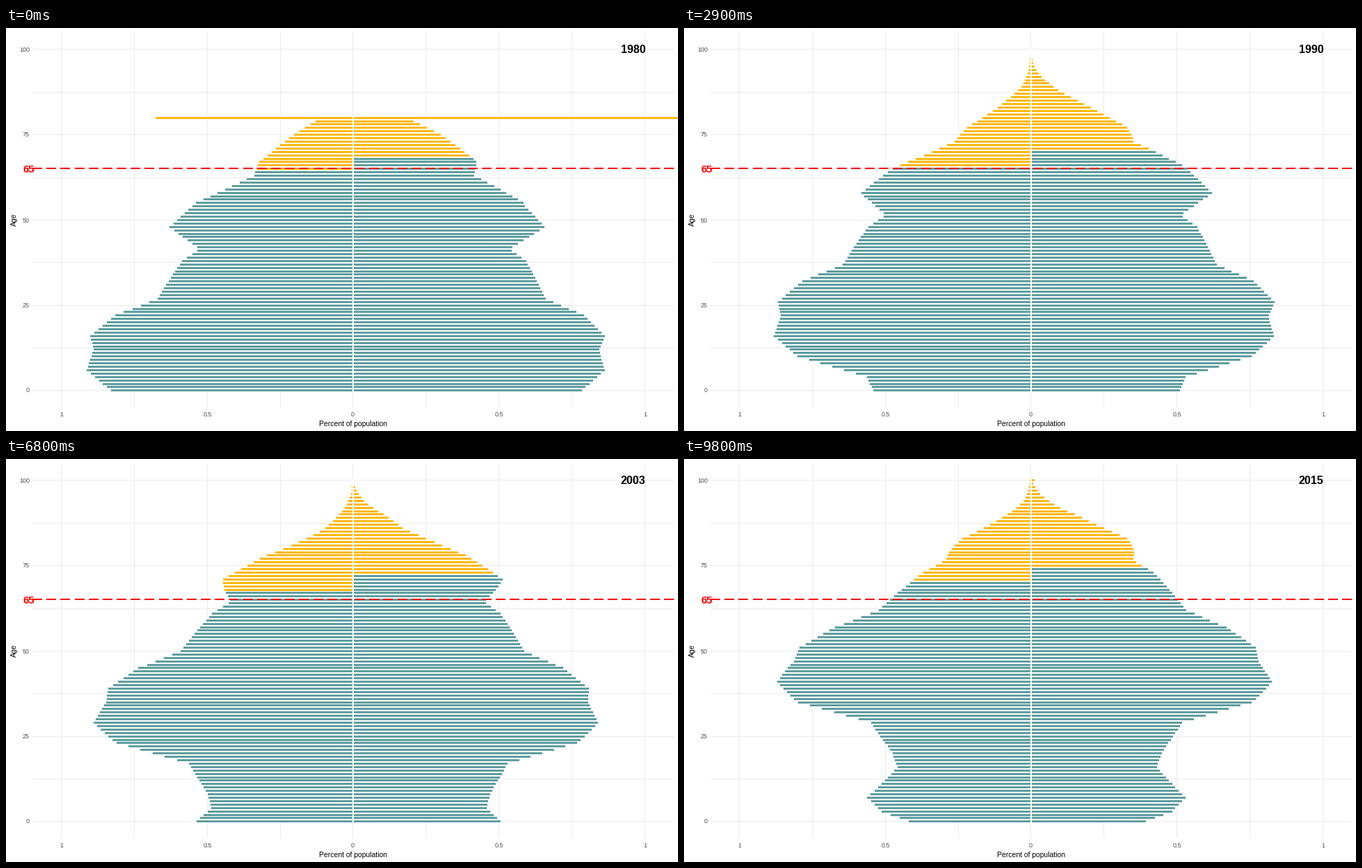
Write a matplotlib script that moves like this. It is 966 px wide and 580 px high and loops after 10 s.

```python
import numpy as np
import matplotlib.pyplot as plt
from matplotlib.animation import FuncAnimation
from matplotlib.collections import PolyCollection

W, H, DPI = 966, 580, 100
MID, UNIT = 498.95, 419.6     # x of zero, pixels per percent
BASE, STEP = 521.9, 4.91      # y of age 0, pixels per year of age
TEAL, GOLD, GRID = "#5F9EA0", "#FFB90F", "#EBEBEB"

# Turning points of male births: year, bar length in pixels.
BIRTHS = np.array([
    (1890, 95), (1901, 115), (1905, 138), (1913, 164), (1917, 161),
    (1925, 237), (1932, 269), (1936, 241), (1938.5, 222), (1942, 247),
    (1953, 281), (1958, 341), (1964, 377), (1968, 372), (1974, 382),
    (1980, 347), (1986, 243), (1995, 224), (1999, 222), (2003, 249),
    (2008, 285), (2012, 263), (2015, 216)]).T


def cohort(born, female):
    """Size of a birth year before deaths and migration."""
    ratio = np.interp(born, [1912, 1926, 1970], [1.22, 1.05, 0.95])
    return np.interp(born, *BIRTHS) * (ratio if female else 1)


def survival(age, born, female):
    """Gompertz curve; later birth years live longer."""
    mode, spread = (88.7, 9) if female else (84.4, 10)
    return np.exp(-np.exp((age - mode - 0.12 * (born - 1925)) / spread))


def widths(year, female):
    """Bar lengths by age; the last age holds everyone older."""
    age = np.arange(111)
    born = year - age
    share = np.interp(year, [1980, 1998, 2009, 2015], [1, 0.938, 0.81, 0.806])
    wave = np.interp(year, [1998, 2009, 2015], [0, 0.25, 0.2])
    migration = 1 + wave * np.exp(-((born - 1978.5) / 14) ** 2 / 2)
    w = share * migration * cohort(born, female) * survival(age, born, female)
    top = 100 if year >= 1990 else 80
    return np.round(np.append(w[:top], w[top:].sum()))


def old_age(year, female):
    start, rise = (69.4, 0.165) if female else (65, 0.173)
    return int(start + rise * (year - 1980))


def year_at(n):
    if n < 2:
        return 1980
    return 1981 + (n - 2) // 3 if n < 86 else 2009 + (n - 86) // 2


def age_row(age):
    return np.floor(BASE - STEP * np.asarray(age))


def boxes(x0, x1, y0, y1):
    x0, x1, y0, y1 = np.broadcast_arrays(x0, x1, y0, y1)
    return np.stack([np.stack(p, -1) for p in
                     ((x0, y0), (x1, y0), (x1, y1), (x0, y1))], 1)


def layer(verts, color, z):
    c = PolyCollection(verts, facecolors=color, edgecolors="none",
                       antialiased=False, zorder=z)
    return ax.add_collection(c, autolim=False)


def label(x, y, s, px, color="black", **kw):
    kw = {"ha": "center", "va": "center", **kw}
    return ax.text(x, y, s, size=px * 72 / DPI, color=color, zorder=6,
                   family="Liberation Sans", **kw)


fig = plt.figure(figsize=(W / DPI, H / DPI), dpi=DPI, facecolor="white")
ax = fig.add_axes([0, 0, 1, 1])
ax.set(xlim=(0, W), ylim=(H, 0))
ax.axis("off")

gx = np.floor(MID + UNIT * np.arange(-1, 1.01, 0.25))
gy = age_row(np.arange(0, 101, 12.5))
layer(boxes(gx, gx + 1, 5, 546), GRID, 1)
layer(boxes(38, 960, gy, gy + 1), GRID, 1)

for x, v in zip(gx[::2], (1, 0.5, 0, 0.5, 1)):
    label(x + 0.5, 556.5, f"{v:g}", 9, "#4D4D4D")
for a in range(0, 101, 25):
    label(34, age_row(a) + 1, str(a), 9, "#4D4D4D", ha="right")
label(498.5, 570, "Percent of population", 10.4)
label(11.5, 276, "Age", 10.4, rotation=90)

gaps = layer([], "white", 2)
bars = layer([], TEAL, 3)
dash = np.round(np.linspace(38, 946, 46))
layer(boxes(dash, dash + 14, 201, 203), "red", 4)
label(33, 204, "65", 15, "red", weight="bold")
year_text = label(901.5, 32, "", 16, weight="bold")


def draw(n):
    year = year_at(n)
    gap, fill, colors = [], [], []
    for female in (False, True):
        w = widths(year, female)
        age = np.arange(len(w))
        y = age_row(age)
        inner, side = (500, 1) if female else (498, -1)
        tip = 498 + side * w
        tip = np.maximum(tip, inner) if female else np.minimum(tip, inner)
        gap.append(boxes(499, tip + side, y - 2, y + 3))
        fill.append(boxes(inner, tip, y - 1, y + 2))
        limit = old_age(year, female)
        colors += [GOLD if a >= limit else TEAL for a in age]
    gaps.set_verts(np.concatenate(gap))
    bars.set_verts(np.concatenate(fill))
    bars.set_facecolor(colors)
    year_text.set_text(str(year))
    return gaps, bars, year_text


anim = FuncAnimation(fig, draw, frames=100, interval=100, repeat=True,
                     repeat_delay=0, blit=False)
plt.show()
```
